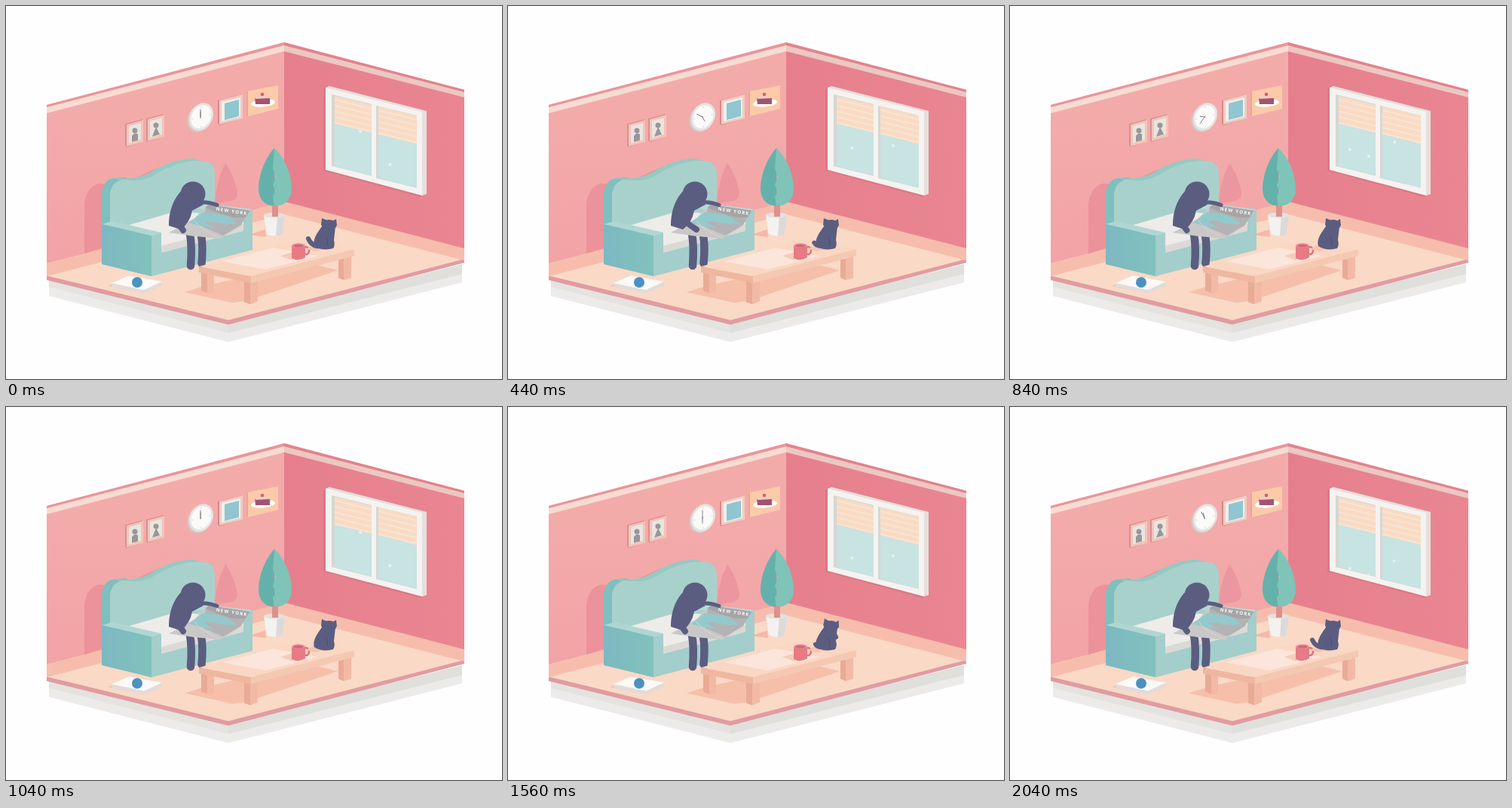
These frames come from a looping animation (658x494 px, 2.08 s). An HTML page:

```html
<!DOCTYPE html>
<html lang="en">
<head>
<meta charset="utf-8">
<title>Living room</title>
<style>
html, body { margin: 0; width: 100%; height: 100%; overflow: hidden; background: #fefefe }
svg { display: block }
.line { fill: none; stroke: #5b5d80; stroke-linecap: round; stroke-linejoin: round }
</style>
</head>
<body>
<svg width="658" height="494" viewBox="0 0 658 494">
<defs>
  <linearGradient id="wallL" x1="0" y1="0" x2="0" y2="1">
    <stop offset=".3" stop-color="#f3abaa"/><stop offset="1" stop-color="#f2a3a6"/>
  </linearGradient>
  <linearGradient id="wallR" x1="0" y1="0" x2="1" y2="0">
    <stop offset="0" stop-color="#e67f8d"/><stop offset="1" stop-color="#e98691"/>
  </linearGradient>
  <linearGradient id="sofaSide">
    <stop offset="0" stop-color="#7db8c1"/><stop offset="1" stop-color="#80c2bd"/>
  </linearGradient>
  <clipPath id="panes"><path d="M436 119L485 131V225L436 212ZM494 133L545 145V241L494 228Z"/></clipPath>
</defs>

<!-- plinth, floor and walls -->
<path fill="#ecebe9" d="M57 361L295 420L605 342V366L295 445L57 384Z"/>
<path fill="#dfdfdc" d="M295 420L605 342V355L295 433Z"/>
<path fill="#e4e3e0" d="M57 361L295 420V433L57 372Z"/>
<path fill="#e19ca0" d="M54 357L295 414L608 333V340L295 422L54 363Z"/>
<path fill="#fad9c6" d="M54 357L369 274L608 335L295 416Z"/>
<path fill="#f6bdad" d="M54 341L369 258L608 320V337L369 276L54 358Z"/>
<path fill="url(#wallL)" d="M54 131L369 49V259L54 341Z"/>
<path fill="url(#wallR)" d="M369 49L608 111V321L369 259Z"/>
<path fill="#f6dcd2" d="M54 134L369 52V60L54 142Z"/>
<path fill="#ecc8c2" d="M369 52L608 114V121L369 60Z"/>
<path fill="#ec949b" d="M54 131L369 48V52L54 134Z"/>
<path fill="#e4828d" d="M369 48L608 111V114L369 52Z"/>

<!-- shadows on the wall -->
<path fill="#eb929b" d="M104 328V262Q107 239 124 235L145 237C165 233 180 223 200 215Q212 211 220 214V290Z"/>
<path fill="#ec969f" d="M291 208Q278 234 277 262L300 258Q307 255 307 247Q303 225 291 208Z"/>

<!-- pictures -->
<g id="portrait">
  <path fill="#d98f91" d="M158 156L181 150V180L160 187L158 185Z"/>
  <path fill="#f2c5b6" d="M160 157L182 151V180L160 186Z"/>
  <path fill="#e8e5e1" d="M163 159L179 155V177L163 182Z"/>
  <circle cx="171" cy="165" r="3.5" fill="#999699"/>
</g>
<path fill="#999699" d="M167 180V172Q171 166 175 170V178Z"/>
<use href="#portrait" x="28" y="-7"/>
<path fill="#999699" d="M194 173L199 160L204 170Z"/>
<path fill="#d5898c" d="M281 125L313 117V149L283 158L281 156Z"/>
<path fill="#f0cdc0" d="M283 125L314 117V149L283 157Z"/>
<path fill="#f1eeec" d="M286 127L311 121V147L286 153Z"/>
<path fill="#8fc6d0" d="M290 129L309 124V146L290 151Z"/>
<path fill="#eda494" d="M319 114L322 113V146L319 145Z"/>
<path fill="#fbcba9" d="M321 113L361 105V136L321 146Z"/>
<ellipse cx="341" cy="128.5" rx="16" ry="5" fill="#fff" transform="rotate(-5 341 128)"/>
<path fill="#a2546f" d="M330 121L350 122V130L331 130Z"/>
<path fill="#f3cbc7" d="M330 121L340 118L350 122L331 123Z"/>
<circle cx="340" cy="117" r="2.3" fill="#cf6075"/>

<!-- clock -->
<g transform="matrix(.9 -.22 0 1 258 147)">
  <circle cx="-1" cy="1" r="18.5" fill="#d3c8c7"/>
  <circle cx="1" r="18" fill="#e6e3e1"/>
  <circle cx="1" r="15" fill="#fbfaf9"/>
  <path stroke="#d0cdcd" d="M1 -14v2M1 14v-2M-13 0h2M15 0h-2"/>
  <g stroke="#777581" stroke-width=".9" stroke-linecap="round">
    <path id="minute" d="M0 1V-10"/>
    <path id="hour" d="M0 1V-7"/>
  </g>
</g>

<!-- window -->
<path fill="#dc7686" d="M421 110L426 106L552 251L550 253L421 218Z"/>
<path fill="#e6dfdc" d="M424 108L429 106L558 139V249L552 251Z"/>
<path fill="#f5f3f0" d="M424 108L552 140V251L424 217Z"/>
<path fill="#d6d6d3" d="M432 117L485 130V225L432 212ZM491 132L545 145V241L491 228Z"/>
<path fill="#c7e3e2" d="M436 119L485 131V225L436 212ZM494 133L545 145V241L494 228Z"/>
<g clip-path="url(#panes)">
  <g id="snow" fill="#e6f2f0"></g>
  <path fill="#fbdac2" d="M436 119L485 131V168L436 156ZM494 133L545 145V183L494 170Z"/>
  <g id="slats" stroke="#f3e6d8" stroke-width="2"></g>
</g>

<!-- plant -->
<path fill="#f4b9a8" d="M344 296L322 303L345 306Z"/>
<path fill="#64b1ab" d="M356 188C345 200 335 222 335 242C335 257 345 265 357 265Z"/>
<path fill="#80c3b8" d="M356 188C369 200 379 222 379 242C379 257 369 265 356 265L354 252L358 246L354 237L358 226L354 215Z"/>
<path fill="#f4f2f0" d="M342 277H370L367 302Q357 307 346 302Z"/>
<path fill="#dcdad8" d="M360 277H370L367 302Q363 305 358 304Z"/>
<ellipse cx="356" cy="277" rx="14" ry="3.5" fill="#e4e1df"/>
<path fill="#dc928c" d="M353 264H361V279H353Z"/>

<!-- sofa -->
<path fill="#7fbfbf" d="M127 300V247Q130 230 143 228L160 227L160 300Z"/>
<path fill="#95c9c4" d="M143 228C178 231 188 222 202 214Q228 202 247 202L275 209L210 250Z"/>
<path fill="#a9d1cc" d="M138 302V248Q141 232 155 230C182 234 192 227 205 219C230 206 252 202 269 207Q277 211 277 222V290Z"/>
<path fill="#edece9" d="M160 291L225 272L318 279V296L205 325Z"/>
<path fill="#dad9d6" d="M205 318L318 288V298L205 328Z"/>
<path fill="#b9dad6" d="M252 268L266 262L327 269L315 275Z"/>
<path fill="#a3cecb" d="M315 273L327 269V323L193 358V304L206 300V327L315 298Z"/>
<path fill="#b0d6d2" d="M127 289L141 285L206 300L193 304Z"/>
<path fill="url(#sofaSide)" d="M127 289L193 304V358L127 342Z"/>

<!-- book -->
<path fill="#f3bba9" d="M136 371L160 359L175 378Z"/>
<path fill="#e4dbd8" d="M140 367L183 375L207 365V371L183 381L140 373Z"/>
<path fill="#fbfaf9" d="M140 367L163 357L207 365L183 376Z"/>
<circle cx="174" cy="366" r="7" fill="#4b91c2"/>

<!-- reader -->
<g class="line" stroke-width="10.5">
  <path d="M244 302Q247 318 245 344"/>
  <path d="M258 300Q262 314 259.5 341"/>
</g>
<path fill="#c9c8c7" d="M216 300L233 291L250 281L268 263L322 271L312 290L285 308L250 305Z"/>
<path fill="#b3b3b5" d="M265 266L269 263L323 271L312 290L288 304L262 293Z"/>
<path fill="#a5a5a8" d="M265 267L269 263L323 271L318 280L302 280L281 274Z"/>
<path id="page" fill="#94c9cb"/>
<path fill="none" stroke="#d7d6d5" d="M250 284Q258 297 284 307"/>
<text transform="translate(278.5 270.5) rotate(9)" font-family="Open Sans, sans-serif" font-weight="700" font-size="6" letter-spacing="1.3" fill="#fff">NEW YORK</text>
<path fill="#5b5d80" d="M237 241C223 252 216 270 216 291L232 296Q244 287 247 271L262 263Z"/>
<circle cx="248" cy="249" r="16.5" fill="#5b5d80"/>
<path class="line" stroke-width="5" d="M256 260Q268 259 280 263.5"/>
<path class="line" stroke-width="8" id="arm"/>

<!-- table -->
<path fill="#f5bfaa" d="M237 379L262 371L400 340L440 350L318 391L300 393Z"/>
<path fill="#e9aa96" d="M259 348H269V381L259 377ZM441 335H448V363L441 360ZM316 362H324V395L316 392Z"/>
<path fill="#f2baa5" d="M267 350H276V379L267 381ZM448 331H458V360L448 363ZM324 362H334V391L324 395Z"/>
<path fill="#fad7c3" d="M256 345L392 309L462 322L325 358Z"/>
<path fill="#fce5da" d="M286 338L354 320L414 331L344 349Z"/>
<path fill="#efb7a0" d="M256 345L325 358V367L256 353Z"/>
<path fill="#f5c8b2" d="M325 358L462 322V331L325 367Z"/>

<!-- mug -->
<path fill="#f3ccba" d="M364 331L380 326V337Z"/>
<ellipse cx="398" cy="324" rx="4" ry="5" fill="none" stroke="#df6f7b" stroke-width="2.5"/>
<path fill="#e87a83" d="M379 317H397V333Q388 339 379 334Z"/>
<ellipse cx="388" cy="317" rx="9" ry="3" fill="#f09aa0"/>
<ellipse cx="388" cy="317.5" rx="7" ry="2" fill="#d2687a"/>

<!-- cat -->
<path fill="#f3c5b1" d="M398 322L412 314L430 320L410 325Z"/>
<path class="line" stroke-width="6" id="tail"/>
<path fill="#5b5d80" d="M419 292C414 299 406 309 409 318Q420 325 434 321Q437 317 435 310L437 292Z"/>
<g id="head" fill="#5b5d80">
  <ellipse cx="428.5" cy="290" rx="10" ry="7"/>
  <path d="M418 290L419 281L426 284L433 285L438 282L439 291Z"/>
</g>
<path class="line" stroke-width="5" id="paw"/>
<path fill="none" stroke="#4b4e72" d="M426 317Q428 310 424 306"/>
</svg>

<script>
const LOOP = 2080, STEP = 40;
const el = id => document.getElementById(id);
const mix = (a, b, k) => (a + (b - a) * k).toFixed(2);
const set = (id, d) => el(id).setAttribute("d", d);
// smooth rise and fall between two times
const bump = (t, from, to) =>
  t > from && t < to ? Math.min(1, 1.4 * Math.sin(Math.PI * (t - from) / (to - from)) ** 2) : 0;

// start points of the flakes, x and y
const flakes = [[470, 166], [457, 122], [450, 220], [475, 229], [510, 210], [510, 119]];
const TOP = 104, FALL = 156;
el("snow").innerHTML = '<circle r="2"/>'.repeat(flakes.length);

let slats = "";
for (let i = 0; i < 5; i++) {
  const y = 124 + i * 7.6;
  slats += `<path d="M436 ${y}l49 12M494 ${y + 14}l51 12.5"/>`;
}
el("slats").innerHTML = slats;

function draw(t) {
  const p = t / LOOP, wave = Math.cos(2 * Math.PI * p);
  el("minute").setAttribute("transform", `rotate(${1440 * p})`);
  el("hour").setAttribute("transform", `rotate(${720 * p})`);

  [...el("snow").children].forEach((flake, i) => {
    const [x, y] = flakes[i];
    flake.setAttribute("cx", x + Math.sin(4 * Math.PI * p + i));
    flake.setAttribute("cy", TOP + (y - TOP + 2 * FALL * p) % FALL);
  });

  const reach = bump(t, 160, 720), sway = Math.sin(4 * Math.PI * p) * .5;
  set("arm", `M224 272Q${mix(227, 232, reach)} ${mix(288, 285, reach)} ${mix(235 + sway, 250, reach)} ${mix(297, 296, reach)}`);
  const fold = 1.5 * wave;
  set("page", `M243 287L261 273L285 276Q${298 + fold} ${279 - fold} 306 289L284 288Q272 ${283 + fold} 263 286L276 294L256 291Z`);

  // the tail sinks first, then tucks in
  const tuck = (1 - wave) / 2, sink = Math.sqrt(tuck);
  set("tail", `M420 318Q${mix(406, 416, tuck)} ${mix(320, 318, tuck)} ${mix(401, 415, tuck)} ${mix(308, 317, sink)}`);
  const lick = bump(t, 1360, 2020);
  set("paw", `M432 298Q${mix(433, 438, lick)} ${mix(308, 309, lick)} ${mix(432, 435, lick)} ${mix(318, 302, lick)}`);
  el("head").setAttribute("transform", `rotate(${5 * lick} 428 292)`);
}

const start = performance.now();
function tick() {
  const t = (performance.now() - start) % LOOP;
  draw(Math.floor(t / STEP) * STEP);
  requestAnimationFrame(tick);
}
tick();
</script>
</body>
</html>
```
